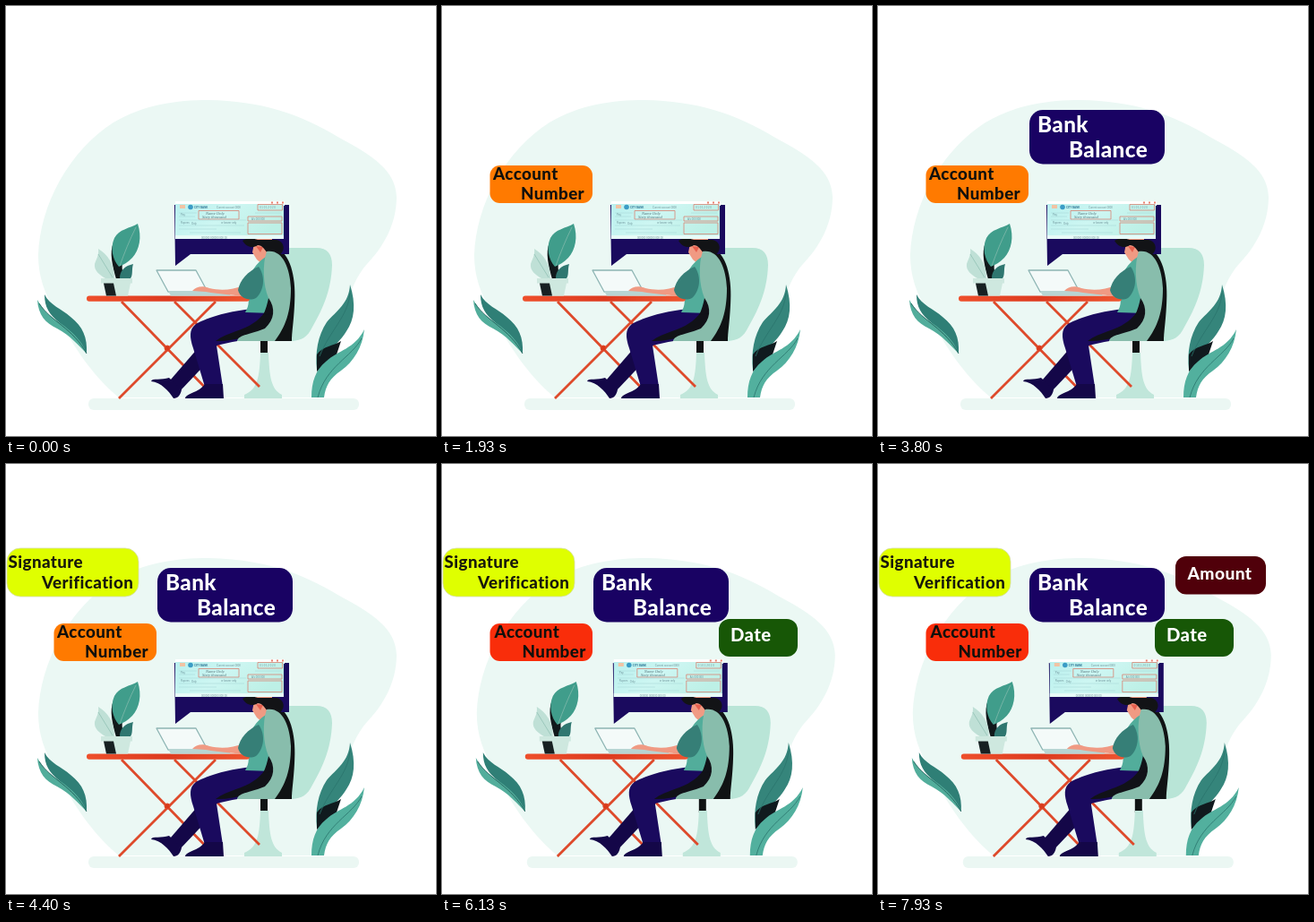
An HTML page for the animation above (8000 ms loop, 480 px wide and 480 px high).

```html
<!DOCTYPE html>
<html lang="en">
<head>
<meta charset="utf-8">
<title>Cheque checks</title>
<style>
  html, body { margin: 0; width: 100%; height: 100%; overflow: hidden; background: #fff; }
  svg { display: block; width: 100%; height: 100%; }
  .tag { font-family: Lato, sans-serif; font-weight: 800; letter-spacing: .025em; }
  .tiny { font-family: "Liberation Sans", sans-serif; font-size: 2.8px; fill: #6d9299; }
  .hand { font-family: "Liberation Serif", serif; font-style: italic; font-size: 4.6px; fill: #58757d; }
</style>
</head>
<body>
<svg viewBox="0 0 480 480">
  <defs>
    <linearGradient id="paper" x2="1" y2=".4">
      <stop offset="0" stop-color="#b9f0ee"/>
      <stop offset=".5" stop-color="#cdf6f2"/>
      <stop offset="1" stop-color="#bdf0e6"/>
    </linearGradient>
    <linearGradient id="desk">
      <stop offset="0" stop-color="#ee4f2b"/>
      <stop offset=".5" stop-color="#dd3a1f"/>
      <stop offset="1" stop-color="#ee5530"/>
    </linearGradient>
  </defs>

  <g id="scene">
    <path fill="#ebf8f4" d="M36 278C38 222 70 162 120 130C154 110 190 105 226 105C284 106 328 120 372 147C412 168 435 185 436 213C436 244 421 269 403 288C383 310 374 350 352 437H126C101 417 75 382 56 343C43 321 36 302 36 278Z"/>
    <rect x="92" y="438" width="302" height="13" rx="6" fill="#ebf7f3"/>

    <g id="sidePlants">
      <path fill="#2f7f76" d="M43 322C49 334 62 338 72 347C86 358 91 370 90 388C83 374 72 365 60 354C48 344 43 336 43 322Z"/>
      <path fill="#52ad9b" d="M35 328C36 345 44 354 57 360C71 367 82 380 90 388C84 372 74 364 62 355C50 347 42 341 35 328Z"/>
      <path fill="none" stroke="#1c5754" stroke-width=".8" d="M37 332C50 352 75 360 90 388"/>
      <path fill="#35857b" d="M384 311C391 333 389 350 380 363C372 377 356 386 347 406C345 387 348 368 358 353C369 340 383 332 384 311Z"/>
      <path fill="#101a1e" d="M347 389C353 380 367 379 374 374L369 389L347 408Z"/>
      <path fill="#52b09e" d="M400 361C398 381 388 397 374 407C361 416 357 424 355 437H341C341 419 346 406 357 397C371 384 389 383 400 361Z"/>
      <path fill="none" stroke="#2a746d" stroke-width=".8" d="M384 320C382 347 362 361 350 391M397 371C386 392 357 402 348 437"/>
    </g>

    <g id="chair">
      <path fill="#b9e5d7" d="M308 270H344C358 269 364 276 364 289C363 320 352 341 340 362C334 372 327 374 315 374H300Z"/>
      <path fill="#101314" d="M304 271C319 280 324 306 322 334C321 354 319 364 319 374H284L296 345Z"/>
      <path fill="#101314" d="M284 372H292V389H284Z"/>
      <path fill="#c0e6da" d="M284 387H293C294 414 296 428 308 434V438H266V434C281 428 283 414 284 387Z"/>
    </g>

    <g id="table" fill="none" stroke="#de4a2b" stroke-width="2.8">
      <path d="M234 330L126 438M129 330L233 437M188 330L283 425"/>
      <circle cx="180" cy="382" r="3" fill="#d93a1b" stroke-width="1"/>
    </g>

    <path id="bubble" fill="#1a0a5e" d="M188 222H316V277H206L189 290Z"/>

    <g id="person">
      <path fill="#140748" d="M239 369L215 381L183 418L195 429L231 391Z"/>
      <path fill="#1a0a5e" d="M276 338C251 340 226 347 212 355C204 361 205 370 209 382L222 425H242L235 379C258 373 285 371 301 361L294 336Z"/>
      <path fill="#111218" d="M298 333L301 361C279 365 256 375 234 374C247 364 266 362 276 354C285 349 288 341 298 333Z"/>
      <path fill="#140748" d="M182 415L196 428C195 434 192 438 187 438C182 430 173 420 162 419C163 415 174 418 182 415Z"/>
      <path fill="#140748" d="M222 422H242L243 438H200C201 432 215 432 222 422Z"/>
      <path fill="#f09a83" d="M278 260H297V282L287 289L280 283L275 275Z"/>
      <path fill="#e5604f" d="M279 268L287 269L284 275Z"/>
      <path fill="#121316" d="M264 262C270 258 277 260 281 261H302C309 262 312 270 308 275C304 282 296 281 292 276C289 272 286 267 281 267C275 271 268 269 264 262Z"/>
      <path fill="#52ad9b" d="M290 280C279 287 272 298 268 312C272 326 272 334 267 342L298 343L304 288Z"/>
      <path fill="#111218" d="M296 306L300 343L287 345C293 333 294 320 296 306Z"/>
      <path fill="#88bdac" d="M291 274C308 271 317 291 318 315C318 342 312 358 300 374H258C259 367 275 366 289 360C300 350 301 337 293 326C287 312 286 288 291 274Z"/>
    </g>

    <rect x="90" y="323.500" width="182" height="6.300" rx="3" fill="url(#desk)"/>

    <g id="laptop">
      <path fill="#f4faf9" stroke="#8eb5b4" stroke-width="1.3" stroke-linejoin="round" d="M168 295H212L225 319H181Z"/>
      <path fill="#b7d5d3" d="M181 318H252L250 323.500H184Z"/>
      <path fill="#f09a83" d="M265 312L272 326C258 322 238 322 223 319L208 318C212 313 220 312 227 315C240 318 253 317 265 312Z"/>
      <path fill="#367f77" d="M282 291C270 296 261 306 259 317C261 326 271 330 279 326C288 318 290 302 282 291Z"/>
    </g>

    <g id="pot">
      <path fill="#11191b" d="M120 264C115 276 119 290 123 305H134C130 298 129 293 130 288Z"/>
      <path fill="#409d8b" d="M147 243C152 258 149 272 141 281C136 286 131 289 126 291C119 283 116 270 121 259C126 249 139 248 147 243Z"/>
      <path fill="#bfe0d6" d="M103 271C114 278 121 288 121 304H111C104 300 98 295 99 288C101 282 104 278 103 271Z"/>
      <path fill="#2f7770" d="M127 304C127 295 133 290 142 288C140 294 142 300 139 304Z"/>
      <path fill="none" stroke="#8bbdb0" stroke-width=".7" d="M103 277L119 303M145 247C138 261 132 276 127 290"/>
      <path fill="#cee8df" d="M106 304H141V309.500H139L136 323.500H112L109 309.500H106Z"/>
      <path fill="#172022" d="M109 309.500H120L123 323.500H112Z"/>
    </g>

    <g id="cheque">
      <rect x="189" y="218" width="122" height="5" fill="#fff"/>
      <path fill="#e8816f" d="M296 218.500h2v2h-2zM302 218.500h2v2h-2zM308 218.500h2v2h-2z"/>
      <rect x="189" y="221" width="121" height="39" fill="url(#paper)"/>
      <rect x="189" y="256" width="121" height="4" fill="#e7fbf7"/>
      <rect x="194" y="222" width="6" height="4" fill="#f1c3a4"/>
      <circle cx="206" cy="224.500" r="2.800" fill="#3b9cc6"/>
      <path fill="none" stroke="#d88474" stroke-width=".8" d="M215 228.500H260V238H215ZM281 221.500H308.500V228H281ZM270 235H308V240H270ZM270 242H308V254.500H270Z"/>
      <path stroke="#a3d3d3" stroke-width=".5" d="M193 231H213M193 235H211M193 239H268M193 245H266M278 231H307M193 249H235M205 253H262"/>
      <g class="tiny">
        <text x="210" y="226" style="font-weight:700;fill:#246f90">CITY BANK</text>
        <text x="235" y="226">Current account 0000</text>
        <text x="195" y="234">Pay</text>
        <text x="195" y="243">Rupees</text>
        <text x="207" y="244">Only</text>
        <text x="240" y="243">or bearer only</text>
        <text x="283" y="226">0 1 0 1 2 0 2 0</text>
        <text x="274" y="239">A/c 000 000</text>
        <text x="218" y="259.500">000000 000000 000 00</text>
      </g>
      <g class="hand">
        <text x="223" y="233">Name Only</text>
        <text x="219" y="237.300">Sixty thousand</text>
      </g>
    </g>
  </g>

  <g id="tags" class="tag"></g>
</svg>

<script>
  const LOOP = 8000, RECOLOR = 5000, NUDGE = 6000;
  const $ = id => document.getElementById(id);

  function add(parent, name, attrs, text = "") {
    const el = document.createElementNS("http://www.w3.org/2000/svg", name);
    for (const key in attrs) el.setAttribute(key, attrs[key]);
    el.textContent = text;
    parent.append(el);
    return el;
  }

  // Each line of a tag is [text, x, baseline].
  function makeTag(at, [x, y, width, height], rx, fill, ink, size, lines) {
    const group = add($("tags"), "g", {});
    const box = add(group, "rect", { x, y, width, height, rx, fill });
    const label = add(group, "g", { fill: ink, "font-size": size });
    for (const [text, tx, ty] of lines) add(label, "text", { x: tx, y: ty }, text);
    return { at, group, box, label };
  }

  const account = makeTag(1000, [53.5, 178, 114.5, 42], 11, "#ff7a00", "#10100c", 18.8,
    [["Account", 57, 194], ["Number", 88, 216]]);
  const bank = makeTag(3000, [169, 116, 151, 60.5], 15, "#190263", "#fff", 24.3,
    [["Bank", 178, 140.5], ["Balance", 213, 169]]);
  const signature = makeTag(4000, [1, 94, 147, 54], 15, "#dfff00", "#18190b", 18.8,
    [["Signature", 2.5, 115.5], ["Verification", 40, 138.5]]);
  const date = makeTag(NUDGE, [309, 173, 88, 42], 12, "#175706", "#fff", 20.3,
    [["Date", 322, 198]]);
  const amount = makeTag(7000, [332, 103, 101, 42.5], 12, "#50000a", "#fff", 19.2,
    [["Amount", 345.5, 129]]);
  signature.box.setAttribute("stroke", "#d5dcae");
  signature.box.setAttribute("stroke-width", .8);

  const tags = [account, bank, signature, date, amount];

  function draw(t) {
    for (const { at, group } of tags) group.setAttribute("visibility", t >= at ? "visible" : "hidden");
    account.box.setAttribute("fill", t >= RECOLOR ? "#f92d0a" : "#ff7a00");
    const moved = t >= NUDGE;
    $("scene").setAttribute("transform", `translate(${moved ? 2.8 : 0} 0)`);
    account.label.setAttribute("transform", `translate(${moved ? 1.6 : 0} 0)`);
  }

  const start = performance.now();
  function tick() {
    draw((performance.now() - start) % LOOP);
    requestAnimationFrame(tick);
  }
  tick();
</script>
</body>
</html>
```
